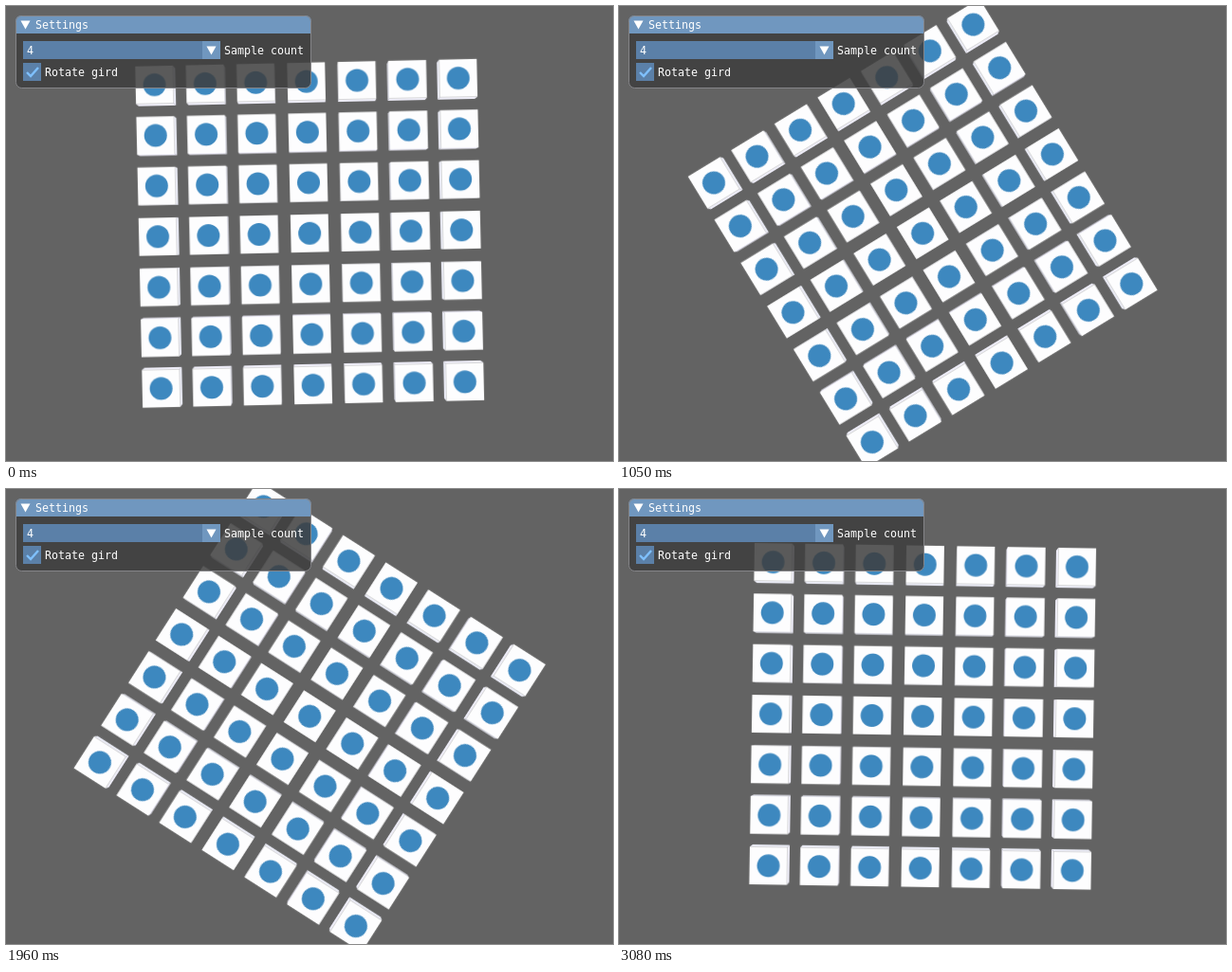
Animation of 640x480 px, one loop 3150 ms. Source, as an HTML page:

```html
<!DOCTYPE html>
<html lang="en">
<head>
<meta charset="utf-8">
<title>Rotating grid</title>
<style>
  html, body { margin: 0; width: 100%; height: 100%; overflow: hidden; background: #636363; }
  svg { display: block; width: 640px; height: 480px; }
  text { font: 11.63px "DejaVu Sans Mono", monospace; fill: #fff; white-space: pre; }

  .front { fill: #fdfdfe; }
  .side-x { fill: #e8e9f3; }
  .side-y { fill: #edecf7; }
  .mark { fill: #3d88bf; }
  .field { fill: #5b80a8; }
  .accent { fill: #7097bf; }

  #grid { animation: turn 3150ms infinite; }

  /* One pose every 70 ms; the turning speed varies slightly between stops. */
  @keyframes turn {
    0%       { transform: rotate(-1.26deg); animation-timing-function: steps(6); }
    13.3333% { transform: rotate(-14.7deg); animation-timing-function: steps(9); }
    33.3333% { transform: rotate(-31.4deg); animation-timing-function: steps(9); }
    53.3333% { transform: rotate(-49.8deg); animation-timing-function: steps(8); }
    71.1111% { transform: rotate(-65deg);   animation-timing-function: steps(6); }
    84.4444% { transform: rotate(-77.5deg); animation-timing-function: steps(6); }
    97.7778%, 100% { transform: rotate(-89.1deg); }
  }
</style>
</head>
<body>
<svg viewBox="0 0 640 480">
  <rect width="640" height="480" fill="#636363"/>
  <g transform="translate(320.2 239.8)"><g id="grid"></g></g>

  <g id="panel">
    <rect x="10.5" y="10.5" width="311" height="76" rx="6" fill="#3e3e3e" fill-opacity=".85"/>
    <path class="accent" d="M10 29V16a6 6 0 0 1 6-6H316a6 6 0 0 1 6 6V29Z"/>
    <rect x="10.5" y="10.5" width="311" height="76" rx="6" fill="none" stroke="#858589"/>
    <path d="M15.5 15.5h10l-5 9Z" fill="#fff"/>
    <text x="31" y="24">Settings</text>

    <rect class="field" x="18" y="37" width="189" height="19"/>
    <rect class="accent" x="207" y="37" width="19" height="19"/>
    <path d="M211.5 42.5h10l-5 9Z" fill="#fff"/>
    <text x="22" y="51">4</text>
    <text x="230" y="51">Sample count</text>

    <rect class="field" x="18" y="60" width="19" height="19"/>
    <path d="M22 70l4 4 8-9" fill="none" stroke="#7fc0ff" stroke-width="2.4"/>
    <text x="41" y="74">Rotate gird</text>
  </g>
</svg>
<script>
  const grid = document.getElementById('grid');
  const PITCH = 53.4, HALF = 19.9, BACK = 0.983;

  function add(tag, attrs) {
    const el = document.createElementNS('http://www.w3.org/2000/svg', tag);
    for (const key in attrs) el.setAttribute(key, attrs[key]);
    grid.appendChild(el);
  }

  // Side face between front edge a-b and the same edge at the back.
  function addSide(name, a, b) {
    const back = p => p.map(v => v * BACK);
    add('polygon', { class: name, points: [a, b, back(b), back(a)].join(' ') });
  }

  function addBox(x, y) {
    const innerX = x - Math.sign(x) * HALF, innerY = y - Math.sign(y) * HALF;
    if (x) addSide('side-x', [innerX, y - HALF], [innerX, y + HALF]);
    if (y) addSide('side-y', [x - HALF, innerY], [x + HALF, innerY]);
    add('rect', { class: 'front', x: x - HALF, y: y - HALF, width: 2 * HALF, height: 2 * HALF });
    add('circle', { class: 'mark', cx: x, cy: y, r: 12 });
  }

  for (let row = -3; row <= 3; row++)
    for (let col = -3; col <= 3; col++) addBox(col * PITCH, row * PITCH);
</script>
</body>
</html>
```
